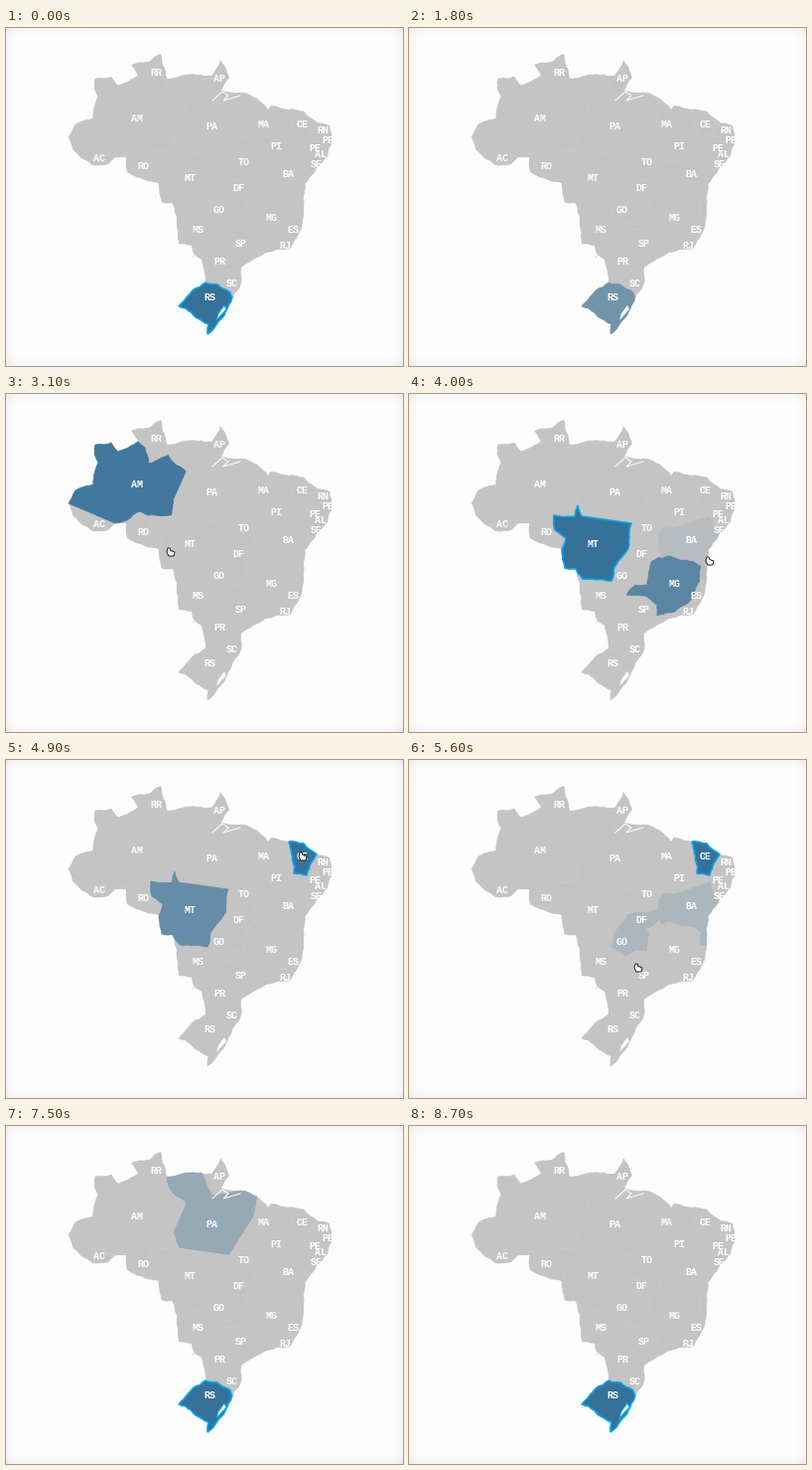
A matplotlib script for the animation above (8.8 s loop, 400 px wide and 340 px high).

```python
import math

import matplotlib.pyplot as plt
import numpy as np
from matplotlib.animation import FuncAnimation
from matplotlib.patches import Polygon

W, H, DPI = 400, 340, 100
FRAMES, STEP = 88, 100
LOOP = FRAMES * STEP
RISE, FADE = 100, 600
PX = 72 / DPI
GRAY, BLUE = np.array([196, 196, 196]) / 255, np.array([54, 113, 153]) / 255
CYAN, BORDER, PAPER = "#08a8ec", "#cacaca", "#fdfdfd"

# Key points of the country outline, clockwise; roughen() adds the small detail.
AM_EDGE = [(63, 110), (70, 97), (88, 91), (93, 69), (89, 60), (90, 51), (106, 49),
           (113, 58), (133, 48)]
NORTH = [(126, 37), (144, 34), (156, 26), (158, 37), (162, 51), (182, 47), (207, 48),
         (216, 32), (225, 50), (217, 63), (236, 65), (253, 71), (264, 82), (267, 78)]
CE_COAST = [(285, 82), (300, 84), (313, 95)]
EAST = [(326, 98), (329, 114), (324, 129)]
BA_COAST = [(312, 142), (301, 157), (300, 186)]
SOUTHEAST = [(297, 203), (286, 222), (262, 226), (237, 241), (236, 260)]
RS_EDGE = [(228, 271), (221, 286), (207, 305), (203, 308), (204, 298), (191, 291),
           (181, 282), (174, 280), (188, 264), (201, 256)]
SOUTHWEST = [(200, 246), (197, 233), (189, 227), (187, 219), (174, 217), (172, 190)]
MT_EDGE = [(168, 176), (157, 175), (154, 156)]
WEST = [(140, 153), (122, 145), (121, 130), (110, 130), (103, 137), (87, 138), (67, 122)]
COUNTRY = (AM_EDGE + NORTH + CE_COAST + EAST + BA_COAST + SOUTHEAST + RS_EDGE
           + SOUTHWEST + MT_EDGE + WEST)

STATES = {
    "AM": AM_EDGE + [(140, 54), (144, 70), (157, 64), (164, 61), (182, 78), (169, 107),
                     (168, 122), (143, 122), (135, 118), (122, 127), (110, 130)],
    "PA": [(162, 51), (182, 47), (197, 47), (208, 70), (236, 65), (253, 71), (245, 97),
           (224, 130), (174, 123), (169, 107), (182, 78), (164, 61)],
    "MT": MT_EDGE + [(158, 145), (147, 137), (146, 122), (167, 123), (170, 112), (174, 123),
                     (224, 130), (221, 155), (207, 174), (204, 188), (175, 186)],
    "GO": [(221, 155), (240, 154), (252, 150), (254, 160), (238, 170), (244, 176),
           (240, 192), (218, 197), (204, 188), (207, 174)],
    "MG": [(219, 202), (228, 192), (240, 192), (244, 169), (262, 162), (287, 168),
           (295, 173), (293, 186), (284, 207), (268, 219), (250, 223), (250, 212),
           (238, 203)],
    "BA": [(252, 140), (256, 135), (268, 135), (303, 123)] + BA_COAST
          + [(293, 186), (295, 173), (287, 168), (262, 162), (254, 165)],
    "CE": CE_COAST + [(306, 107), (303, 116), (290, 114), (291, 108)],
    "RS": RS_EDGE + [(213, 258), (226, 266)],
}
LABELS = {
    "RR": (151, 45), "AP": (215, 51), "AM": (132, 91), "PA": (207, 98), "MA": (259, 96),
    "CE": (299, 97), "RN": (319, 102), "PB": (324, 112), "PE": (311, 120), "AL": (317, 127),
    "SE": (313, 136), "PI": (272, 118), "TO": (240, 134), "AC": (94, 130), "RO": (138, 139),
    "MT": (186, 151), "DF": (234, 160), "BA": (284, 147), "GO": (215, 182), "MS": (193, 203),
    "MG": (267, 191), "ES": (289, 202), "SP": (237, 217), "RJ": (281, 218), "PR": (215, 235),
    "SC": (228, 256), "RS": (205, 271),
}
NEIGHBOURS = "MS-GO MS-PR SP-PR PR-SC MA-PI PI-CE TO-MA TO-PI RN-PB".split()

# Time spent in each state: name, enter, leave (ms), whether it was clicked.
VISITS = [("AM", 2400, 3050, True), ("MT", 3200, 4700, True), ("MG", 3700, 3850, False),
          ("BA", 3990, 4050, False), ("CE", 4600, 5850, True), ("BA", 5000, 5100, False),
          ("GO", 5050, 5100, False), ("RS", 5800, LOOP + 1550, True),
          ("GO", 6170, 6270, False), ("MT", 6700, 6750, False), ("PA", 6850, 7100, False)]
# Pointer stops: a state's label or a point between states.
STOPS = [(2400, "PA"), (2500, "AM"), (2900, "AM"), (3100, (166, 159)), (3250, "MT"),
         (3500, "GO"), (3750, "MG"), (4000, (303, 168)), (4700, "CE"), (4900, "CE"),
         (5000, "BA"), (5100, "GO"), (5600, (231, 209)), (5900, "RS"), (6100, "RS"),
         (6270, "GO"), (6700, (212, 130)), (6900, "PA"), (7100, "PA")]
HAND = np.array([(-3, -4), (-1, -4), (0, -1.5), (4, 0), (3, 4), (-2, 4), (-4, 0)])


def split_edge(a, b):
    """Bend an edge at a shifted midpoint, the same way in either direction."""
    length = math.dist(a, b)
    if not 5 < length < 30:
        return [a]
    phase = (a[0] + b[0]) * 1.7 + (a[1] + b[1]) * 2.9
    shift = .06 * length
    middle = ((a[0] + b[0]) / 2 + shift * math.sin(phase),
              (a[1] + b[1]) / 2 + shift * math.cos(phase * 1.3))
    return split_edge(a, middle) + split_edge(middle, b)


def roughen(points):
    return [p for a, b in zip(points, points[1:] + points[:1]) for p in split_edge(a, b)]


def highlight(name, t):
    """Strength of a state's blue, and whether it is selected."""
    level, selected = 0, False
    for state, enter, leave, clicked in VISITS:
        for now in (t, t + LOOP):
            if state == name and now >= enter:
                rise = min((now - enter) / RISE, 1)
                fade = np.clip(1 - (now - leave) / FADE, 0, 1)
                level = max(level, rise * fade)
                selected |= clicked and enter + RISE <= now < leave
    return level, selected


def pointer(t):
    for (t0, a), (t1, b) in zip(STOPS, STOPS[1:]):
        if t0 <= t <= t1:
            start, end = (np.array(LABELS.get(p, p), float) for p in (a, b))
            k = (t - t0) / (t1 - t0)
            return start + (end - start) * k * k * (3 - 2 * k)
    return None


fig = plt.figure(figsize=(W / DPI, H / DPI), dpi=DPI, facecolor=PAPER)
ax = fig.add_axes([0, 0, 1, 1])
ax.set(xlim=(0, W), ylim=(H, 0))
ax.axis("off")

# Soft inner shadow along the stage edges.
x, y = np.meshgrid(np.arange(W) + .5, np.arange(H) + .5)
edge_x, edge_y = np.minimum(x, W - x), np.minimum(y, H - y)
shade = 253 - 10 * np.exp(-(edge_x / 5) ** 1.3) - 10 * np.exp(-(edge_y / 5) ** 1.3)
ax.imshow(shade, cmap="gray", vmin=0, vmax=255, extent=(0, W, H, 0),
          interpolation="nearest", aspect="auto")

ax.add_patch(Polygon(roughen(COUNTRY), fc=GRAY, ec="none"))
for pair in NEIGHBOURS:
    a, b = (np.array(LABELS[name]) for name in pair.split("-"))
    half = (b - a)[::-1] * (-.5, .5)
    ax.plot(*zip((a + b) / 2 - half, (a + b) / 2 + half), color=BORDER, lw=.7 * PX)

shapes = {name: ax.add_patch(Polygon(roughen(points), lw=.7 * PX))
          for name, points in STATES.items()}
lagoon = ax.add_patch(Polygon([(220, 279), (222, 283), (212, 294), (214, 287)],
                              fc=PAPER, lw=PX, zorder=4))
ax.plot([208, 218, 224, 219, 236], [73, 64, 68, 73, 68], color=PAPER, lw=PX, zorder=4)

for name, (cx, cy) in LABELS.items():
    ax.text(cx, cy - .5, name, color="white", family="Liberation Mono", weight="bold",
            size=10 * PX, ha="center", va="center_baseline", zorder=5)
hand = ax.add_patch(Polygon(HAND, fc="white", ec="#222222", lw=PX, zorder=6))


def draw(frame):
    t = frame * STEP
    for name, shape in shapes.items():
        level, selected = highlight(name, t)
        color = GRAY + (BLUE - GRAY) * level
        shape.set_facecolor(color)
        shape.set_edgecolor(CYAN if selected else color if level > 0 else BORDER)
        shape.set_linewidth((1.6 if selected else .7) * PX)
        shape.set_zorder(3 if selected else 2)
        if name == "RS":
            lagoon.set_edgecolor(CYAN if selected else "none")
    position = pointer(t)
    hand.set_visible(position is not None)
    if position is not None:
        hand.set_xy(HAND + position)
    return [*shapes.values(), lagoon, hand]


animation = FuncAnimation(fig, draw, frames=FRAMES, interval=STEP, repeat=True,
                          repeat_delay=0, init_func=lambda: draw(0))
plt.show()
```
